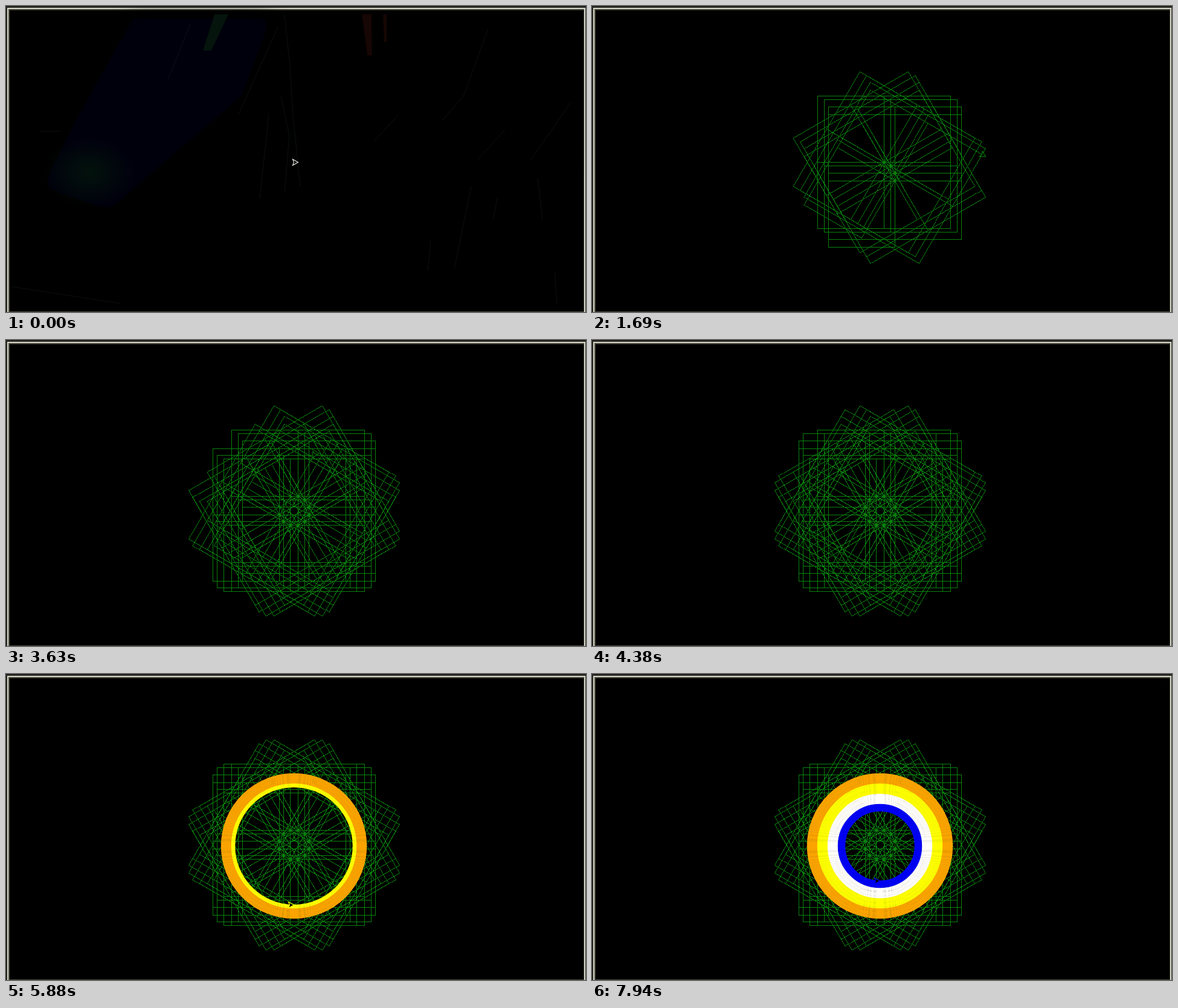
Recreate the animation shown at these times as an HTML page with a canvas. Size 960x508 px, loop 8 s.

```html
<!DOCTYPE html>
<html lang="en">
<head>
<meta charset="utf-8">
<title>Turtle spiral</title>
<style>
  html, body { margin: 0; width: 100%; height: 100%; overflow: hidden; background: #000; }
  canvas, svg { position: absolute; left: 0; top: 0; width: 960px; height: 508px; }
</style>
</head>
<body>
<canvas id="stage" width="960" height="508"></canvas>
<svg viewBox="0 0 960 508">
  <defs>
    <radialGradient id="leaf"><stop offset="0" stop-color="#03120c"/><stop offset="1" stop-color="#03120c" stop-opacity="0"/></radialGradient>
    <filter id="soft"><feGaussianBlur stdDeviation="16"/></filter>
  </defs>
  <g id="ghost" fill="none" stroke="#0d1011">
    <g stroke="none" fill="#040607">
      <path d="M210 20H440L390 150L170 340L60 300L120 180Z" filter="url(#soft)"/>
      <path d="M930 50V260L560 470H440L640 350Z" fill="#030405" filter="url(#soft)"/>
    </g>
    <ellipse cx="138" cy="276" rx="75" ry="58" fill="url(#leaf)" stroke="none"/>
    <path d="M345 14H368L340 74H326Z" fill="#05140c" stroke="none"/>
    <path d="M589 14H605L606 82H598ZM624 14H630V60H626Z" fill="#160604" stroke="none"/>
    <path d="M798 38L757 150L722 190M770 300L742 436M461 14L470 100L475 180L487 300M450 35L385 180M305 30L268 122M455 150L469 215L461 310M435 180L420 320M813 320L806 356M880 285L888 356M703 390L698 440M908 440L912 494M935 160L868 256M826 205L780 256M648 182L610 224M55 208H90M10 466L190 494"/>
  </g>
  <path id="arrow" d="M0 0L-9 -5L-7 0L-9 5Z" fill="#000" stroke-width="1.1"/>
</svg>
<script>
const LOOP = 8000, TICK = 62.5;
const SIDE = 110, STEP = 13, EDGES = 576;
const CENTER = [476, 285], OUTER = 120, BAND = 17;
const GREEN = '#0a820e', PALE = '#f4f4ec';
const BANDS = ['#fba400', '#ffff00', '#fffdfa', '#0000f4'];

const ctx = document.getElementById('stage').getContext('2d');
const arrow = document.getElementById('arrow');
const ghost = document.getElementById('ghost');

// Moves from p along a clockwise heading in degrees.
function walk([x, y], heading, length) {
  const a = heading * Math.PI / 180;
  return [x + length * Math.cos(a), y + length * Math.sin(a)];
}

// Twelve pinwheels of twelve squares, their hubs on a small dodecagon.
function planEdges() {
  const edges = [];
  let pen = [483, 258.9];
  for (let hub = 0; hub < 12; hub++) {
    if (hub) pen = walk(pen, hub * 30, STEP);
    for (let sq = 0; sq < 12; sq++) {
      for (let side = 0; side < 4; side++) {
        const heading = (hub + sq) * 30 + side * 90;
        const to = walk(pen, heading, SIDE);
        edges.push({ from: pen, to, heading });
        pen = to;
      }
    }
  }
  return edges;
}

// Hard one-pixel line.
function line([x0, y0], [x1, y1]) {
  const dx = x1 - x0, dy = y1 - y0;
  const n = Math.max(1, Math.round(Math.max(Math.abs(dx), Math.abs(dy))));
  for (let i = 0; i <= n; i++) {
    ctx.fillRect(Math.round(x0 + dx * i / n), Math.round(y0 + dy * i / n), 1, 1);
  }
}

function ring(index) {
  ctx.strokeStyle = bandColor(index);
  ctx.lineWidth = 1.5;
  ctx.beginPath();
  ctx.arc(CENTER[0] + 0.5, CENTER[1] + 0.5, OUTER - index, 0, Math.PI * 2);
  ctx.stroke();
}

function bandColor(index) {
  return BANDS[Math.floor(index / BAND)];
}

function clear() {
  const box = (color, ...rect) => { ctx.fillStyle = color; ctx.fillRect(...rect); };
  box('#262620', 0, 0, 960, 508);
  box('#d8d8cc', 2, 3, 957, 505);
  box('#4c4c40', 4, 5, 953, 503);
  box('#000', 6, 7, 950, 500);
}

function placeArrow([x, y], heading, color) {
  arrow.setAttribute('transform', `translate(${x + 0.5} ${y + 0.5}) rotate(${heading})`);
  arrow.setAttribute('stroke', color);
}

const edges = planEdges();
const clamp = (v, max) => Math.max(0, Math.min(max, v));
let edgesDone = 0, ringsDone = 0, shown = -1;

function render(tick) {
  if (tick === shown) return;
  if (tick < shown || shown < 0) {
    clear();
    edgesDone = ringsDone = 0;
  }
  shown = tick;

  const progress = clamp(174.48 + 8.305 * (tick - 27), EDGES);
  const edgeCount = Math.floor(progress);
  const ringCount = Math.floor(clamp(36.5 + 1.22 * (tick - 105), 63));

  ctx.fillStyle = GREEN;
  for (; edgesDone < edgeCount; edgesDone++) line(edges[edgesDone].from, edges[edgesDone].to);
  for (; ringsDone < ringCount; ringsDone++) ring(ringsDone);

  if (ringCount) {
    const last = ringCount - 1;
    placeArrow(walk(CENTER, 90, OUTER - last), 0, bandColor(last));
  } else if (edgeCount) {
    // Each edge ends with a right turn, half a beat after the pen arrives.
    const { to, heading } = edges[edgeCount - 1];
    const turn = progress - edgeCount < 0.5 ? 0 : 90;
    placeArrow(to, heading + turn, GREEN);
  } else {
    placeArrow(edges[0].from, 0, PALE);
  }
  ghost.setAttribute('opacity', tick < 5 ? 1 - 0.17 * tick : tick < 19 ? 0.15 : 0);
}

function frame() {
  const t = performance.now() % LOOP;
  render(Math.min(127, Math.floor((t + 5) / TICK)));
  requestAnimationFrame(frame);
}
frame();
</script>
</body>
</html>
```
